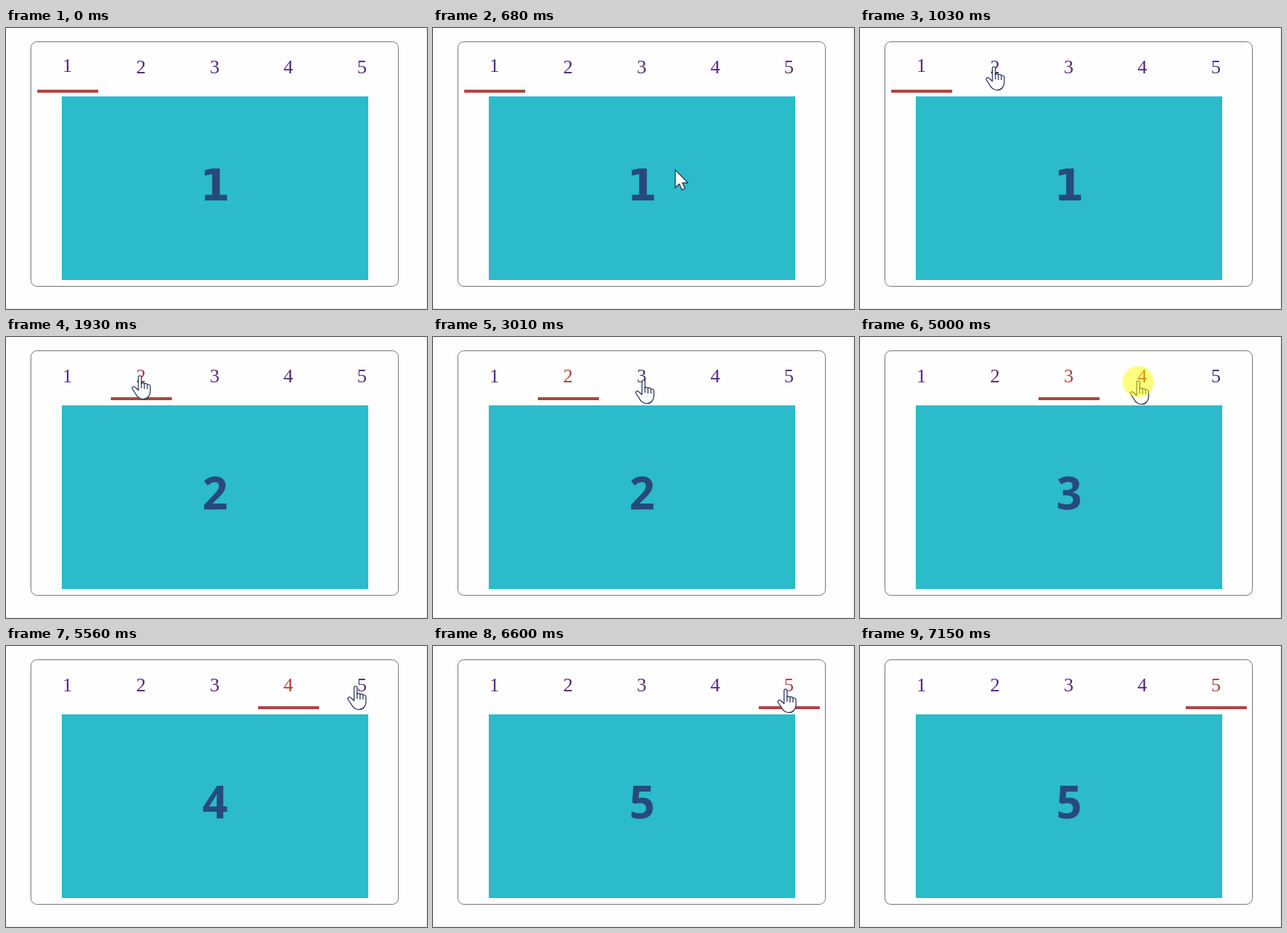
An HTML page for the animation above (8060 ms loop, 566 px wide and 378 px high).

```html
<!DOCTYPE html>
<html lang="en">
<head>
<meta charset="utf-8">
<title>Tabs</title>
<style>
  html, body { margin: 0; width: 100%; height: 100%; overflow: hidden; background: #fefefe; }
  svg { display: block; width: 566px; height: 378px; }
  #tabs text { font: 26px "Liberation Serif", "Times New Roman", serif; text-anchor: middle; }
  #label { font: 700 60px "Open Sans", "Noto Sans", sans-serif; text-anchor: middle; fill: #264b7b; filter: blur(.4px); }
  #label.slab { font: 700 58px "DejaVu Sans", sans-serif; }
  #cursor path { fill: #fff; stroke: #1c2b4d; stroke-width: 1.2; stroke-linejoin: round; }
  #cursor .lines { fill: none; }
</style>
</head>
<body>
<svg viewBox="0 0 566 378">
  <path d="M0 377.5H565.5V0" fill="none" stroke="#ebebeb"/>
  <rect x="33.5" y="18.5" width="494" height="329" rx="8" fill="#fefefe" stroke="#777"/>
  <g id="tabs"></g>
  <rect id="bar" width="82" height="4" fill="#b24442"/>
  <rect x="75" y="92" width="412" height="247" fill="#2bbbca"/>
  <text id="label" x="281" y="232"></text>
  <g id="cursor">
    <g id="hand">
      <path d="M-2 2Q-2 0 0 0T2 2V10.5Q4 8.500 6 10.800Q8.500 9.500 10 12Q13 11 14 14V21C14 27 10 31.500 4.500 31.500C-1 31.500-4 28-6 24L-10 18C-11.500 15-8 13.500-6 16L-2 19.500Z"/>
      <path class="lines" d="M2 10V17M6 11V18M10 12V18"/>
    </g>
    <path id="arrow" d="M0 0V24L5.500 19L9 27L13 25L9.500 17.500H17Z"/>
    <circle id="press" cy="1" r="21" fill="#ff0" fill-opacity=".5"/>
  </g>
</svg>
<script>
  const LOOP = 8060, STEP = 70;
  const $ = id => document.getElementById(id);

  // [time, tab]
  const picks = [[0, 1], [1930, 2], [3690, 3], [5070, 4], [6180, 5]];
  // [from, to, tab]
  const presses = [[1790, 1930, 2], [3630, 3690, 3], [5000, 5070, 4], [6050, 6180, 5]];
  // [time, steps, x, y]
  const moves = [
    [470, 9, 180, 52], [2870, 3, 283, 58], [3350, 1, 284, 59], [4100, 8, 374, 59],
    [5210, 6, 470, 54], [6600, 1, 474, 58], [6940, 4, 556, 390]
  ];
  const START = [430, 290], SHOW = 470, HIDE = 7150;

  const tabs = [1, 2, 3, 4, 5].map(n => {
    const el = document.createElementNS("http://www.w3.org/2000/svg", "text");
    el.setAttribute("x", 99 * n - 16.5);
    el.textContent = n;
    $("tabs").append(el);
    return el;
  });

  const ease = p => p * p * (3 - 2 * p);
  const show = (el, on) => el.setAttribute("visibility", on ? "visible" : "hidden");

  function pointer(t) {
    let [x, y] = START;
    for (const [at, steps, toX, toY] of moves) {
      if (t < at) break;
      const done = Math.min(steps, Math.floor((t - at) / STEP + 1.05));
      const p = ease(done / steps);
      x += (toX - x) * p;
      y += (toY - y) * p;
    }
    return [x, y];
  }

  function draw(t) {
    const active = picks.filter(([at]) => t >= at).pop()[1];
    const press = presses.find(([from, to]) => t >= from && t < to);
    const first = active === 1;

    tabs.forEach((el, i) => {
      const n = i + 1;
      const pressed = press && press[2] === n;
      el.setAttribute("y", first && n === 1 ? 59 : 61);
      el.setAttribute("fill", pressed ? "#c02020" : n === active && !first ? "#b03f40" : "#522a7c");
    });
    $("bar").setAttribute("x", 99 * active - 57);
    $("bar").setAttribute("y", first ? 83 : 81);
    $("label").textContent = active;
    $("label").setAttribute("class", first ? "slab" : "");

    const [x, y] = pointer(t);
    const visible = t >= SHOW && t < HIDE;
    const overTabs = y < 88;
    $("cursor").setAttribute("transform", `translate(${x.toFixed(1)} ${y.toFixed(1)})`);
    show($("hand"), visible && overTabs);
    show($("arrow"), visible && !overTabs);
    show($("press"), press);
  }

  const origin = performance.now();
  function frame() {
    draw((performance.now() - origin) % LOOP);
    requestAnimationFrame(frame);
  }
  frame();
</script>
</body>
</html>
```
